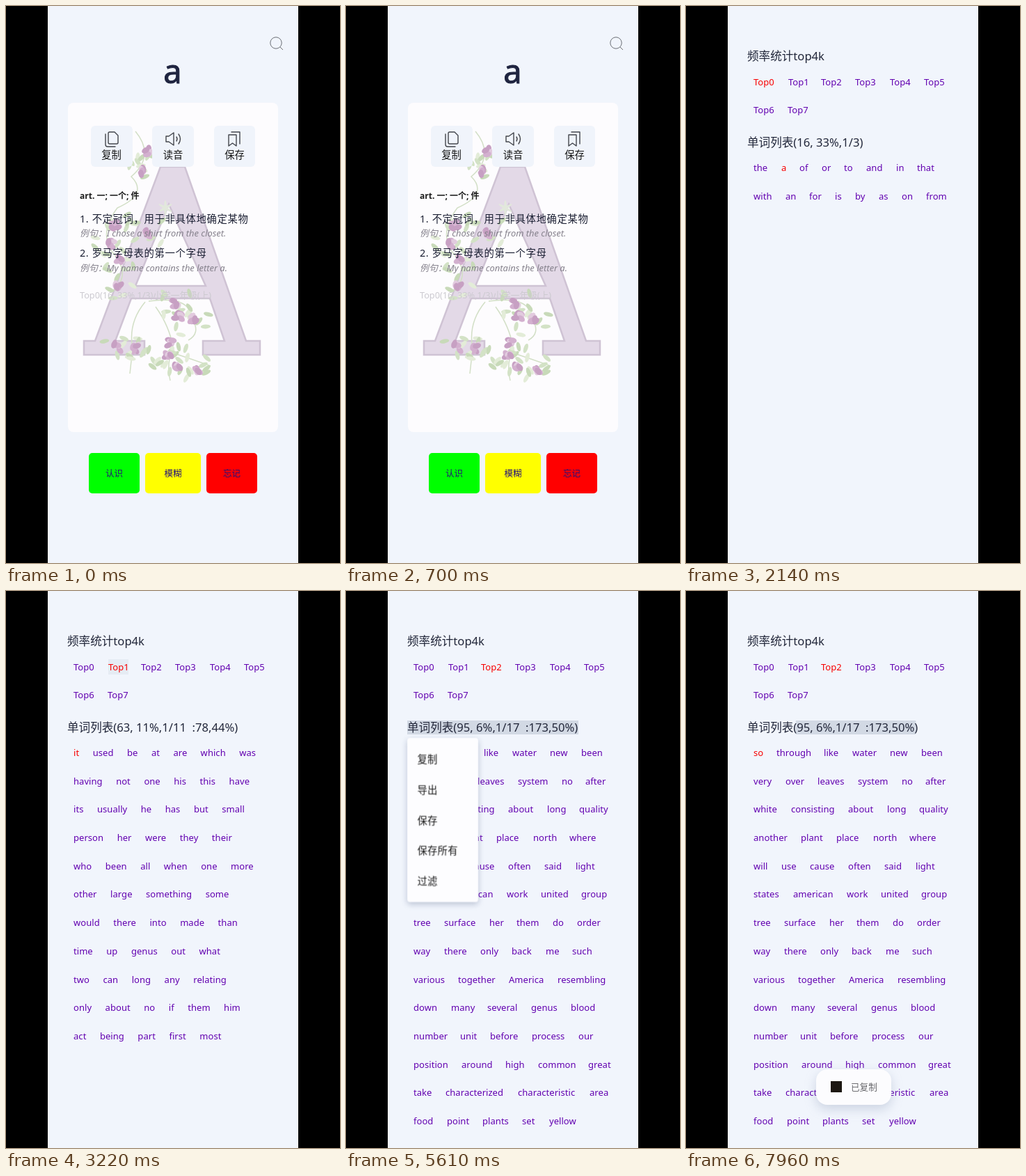
An HTML page for the animation above (8 s loop, 480 by 800 pixels).

```html
<!DOCTYPE html>
<html lang="zh-CN">
<head>
<meta charset="utf-8">
<title>Word list</title>
<style>
html, body { margin: 0; width: 100%; height: 100%; overflow: hidden; background: #000; }
svg { display: block; width: 480px; height: 800px; font-family: "Noto Sans", "Noto Sans CJK SC", "Noto Sans CJK", sans-serif; }
text { white-space: pre; }
.mid { text-anchor: middle; }
.word { font-size: 13px; letter-spacing: .05px; fill: #6200b0; }
.current { fill: #f80000; }
.head { font-size: 16.6px; fill: #22273a; }
.label { font-size: 14.3px; fill: #161616; }
.sense { font-size: 14.4px; letter-spacing: .6px; fill: #1b1f33; }
.example { font-size: 12.9px; font-style: italic; fill: #85818c; }
.answer { font-size: 12.5px; fill: #25107a; text-anchor: middle; }
.icon { fill: none; stroke: #43464c; stroke-width: 1.4; stroke-linejoin: round; stroke-linecap: round; }

#card, #list, #toast, .state { animation: 8s linear infinite; }
#card { animation-name: cardOut; }
#list { animation-name: listIn; }
#toast { animation-name: toast; filter: drop-shadow(0 6px 8px rgba(120,135,170,.3)); }
.state { animation-timing-function: step-end; }
#state0 { animation-name: show0; }
#state1 { animation-name: show1; }
#state2 { animation-name: show2; }
#menu { animation: menuFade 8s linear infinite, menuGrow 8s linear infinite; transform-origin: 139px 211px; filter: drop-shadow(0 3px 4px rgba(100,115,150,.4)); }

/* 700 ms page cross-fade */
@keyframes cardOut { 0%, 11.25% { opacity: 1; animation-timing-function: cubic-bezier(.4,0,.2,1); } 20%, 100% { opacity: 0; } }
@keyframes listIn { 0%, 11.25% { opacity: 0; animation-timing-function: cubic-bezier(.4,0,.2,1); } 20%, 100% { opacity: 1; } }
@keyframes show0 { 0% { visibility: visible; } 36.5%, 100% { visibility: hidden; } }
@keyframes show1 { 0% { visibility: hidden; } 36.5% { visibility: visible; } 52%, 100% { visibility: hidden; } }
@keyframes show2 { 0% { visibility: hidden; } 52%, 100% { visibility: visible; } }
@keyframes menuFade { 0%, 68.8% { opacity: 0; } 69.2%, 88% { opacity: 1; } 89%, 100% { opacity: 0; } }
@keyframes menuGrow { 0%, 68.8% { transform: scale(.8); animation-timing-function: cubic-bezier(0,0,.2,1); } 70.3%, 100% { transform: none; } }
@keyframes toast { 0%, 89.2% { opacity: 0; } 92%, 100% { opacity: 1; } }

.ripple { opacity: 0; fill: #5a6b85; animation: press 8s linear infinite; }
.ripple circle { transform-box: fill-box; transform-origin: center; animation: grow 8s infinite; animation-delay: inherit; }
@keyframes press { 0% { opacity: 0; } .9%, 4.9% { opacity: .2; } 6.9%, 100% { opacity: 0; } }
/* spreads from the touch point to the middle of its area */
@keyframes grow {
  0% { transform: translateX(var(--touch)) scale(.3); animation-timing-function: cubic-bezier(.4,0,.2,1); }
  2.8%, 100% { transform: none; }
}
</style>
</head>
<body>
<svg viewBox="0 0 480 800">
  <rect x="60" width="360" height="800" fill="#f1f5fc"/>

  <g id="card">
    <g fill="none" stroke="#6a6d74"><circle cx="388" cy="53" r="8.2"/><path d="M394 59l4 4"/></g>
    <text class="mid" x="239.5" y="111" font-size="47" fill="#1f2440" stroke="#1f2440">a</text>
    <rect x="89" y="139" width="302" height="473" rx="8" fill="#fdfcfe"/>
    <path d="M222 231H257L345 481H365V501H283V481H314L293 420H180L157 481H199V501H112V481H128Z M234 285L186 402H287Z"
      fill="#e3d9e7" fill-rule="evenodd" stroke="#cfc3d4" stroke-width="2.500"/>
    <g id="vines"></g>
    <g fill="#f0f4fb">
      <rect x="122" y="172" width="60" height="59" rx="6"/>
      <rect x="210" y="172" width="60" height="59" rx="6"/>
      <rect x="299" y="172" width="59" height="59" rx="6"/>
    </g>
    <g class="icon">
      <path d="M149 181h7l5 5v10q0 2-2 2h-10q-2 0-2-2v-13q0-2 2-2zM143 184v15q0 3 3 3h11"/>
      <path d="M230 187h4l7-5v18l-7-5h-4zM245 188q2 3 0 6M248 184q5 7 0 14"/>
      <path d="M320 185h11v16l-5.500-4-5.500 4zM324 181h12v17"/>
    </g>
    <g class="label mid">
      <text x="151.500" y="218.500">复制</text><text x="240" y="218.500">读音</text><text x="328.500" y="218.500">保存</text>
    </g>
    <text x="106" y="277" font-size="12" font-weight="700" fill="#1c1c1c">art. 一; 一个; 件</text>
    <text class="sense" x="106" y="311">1. 不定冠词，用于非具体地确定某物</text>
    <text class="example" x="106" y="331">例句：I chose a shirt from the closet.</text>
    <text class="sense" x="106" y="360">2. 罗马字母表的第一个字母</text>
    <text class="example" x="106" y="380.500">例句：My name contains the letter a.</text>
    <text x="106" y="419.500" font-size="12.7" font-weight="500" fill="#cccad0">Top0(16, 33%,1/3)小学一年级(上)</text>
    <rect x="119" y="642" width="73" height="58" rx="5" fill="#0f0"/>
    <rect x="200" y="642" width="80" height="58" rx="5" fill="#ff0"/>
    <rect x="288" y="642" width="73" height="58" rx="5" fill="#f00"/>
    <text class="answer" x="155.500" y="675.500">认识</text>
    <text class="answer" x="240" y="675.500">模糊</text>
    <text class="answer" x="324.500" y="675.500">忘记</text>
  </g>

  <g id="list">
    <g id="ripples"></g>
    <text class="head" x="88" y="78">频率统计top4k</text>
    <g id="states"></g>
    <g id="menu">
      <rect x="88" y="211" width="102" height="236" rx="4" fill="#fdfdff"/>
      <g id="items"></g>
    </g>
    <g id="toast">
      <rect x="187" y="687" width="108" height="51" rx="16" fill="#fcfcfe"/>
      <rect x="208" y="704" width="16" height="16" fill="#1c1712"/>
      <text x="237" y="716.500" font-size="12.6" fill="#66666a">已复制</text>
    </g>
  </g>
</svg>
<script>
const fill = (id, html) => document.getElementById(id).innerHTML = html;
const ROW = 40.69;

// A leading number is the word's x; words without one follow at a fixed gap.
function wordRows(rows, y, current) {
  return rows.map((row, i) => {
    const words = row.split(' ').map((token, k) => {
      const [, x, word] = token.match(/^(\d*)(.+)$/);
      const place = x ? `x="${x}"` : k ? 'dx="19.5"' : 'x="97"';
      return `<tspan ${place}${word === current ? ' class="current"' : ''}>${word}</tspan>`;
    });
    return `<text class="word" y="${y + i * ROW}">${words.join('')}</text>`;
  }).join('');
}

const tabs = ['97Top0 147Top1 194Top2 243Top3 293Top4 342Top5', '97Top6 146Top7'];
const states = [
  { title: '(16, 33%,1/3)', current: 'a', rows: [
    '97the 137a 163of 195or 227to 259and 302in 332that',
    '97with 143an 177for 214is 243by 277as 310on 345from'] },
  { title: '(63, 11%,1/11  :78,44%)', current: 'it', rows: [
    'it used be at are which was', 'having not one his this have', 'its usually he has but small',
    'person her were they their', 'who been all when one more', 'other large something some',
    'would there into made than', 'time up genus out what', 'two can long any relating',
    'only about no if them him', 'act being part first most'] },
  { title: '(95, 6%,1/17  :173,50%)', current: 'so', rows: [
    '97so 130through 198like 239water 293new 338been',
    '97very 143over 189leaves 247system 310no 344after',
    '97white 151consisting 233about 289long 335quality',
    '97another 165plant 216place 269north 321where',
    '97will 137use 178cause 233often 285said 330light',
    '97states 154american 231work 280united 338group',
    '97tree 141surface 206her 245them 297do 332order',
    '97way 141there 193only 238back 287me 325such',
    '97various 161together 234America 304resembling',
    '97down 151many 203several 266genus 323blood',
    '97number 164unit 207before 267process 334our',
    '97position 166around 229high 276common 348great',
    '97take 143characterized 247characteristic 350area',
    '97food 145point 196plants 253set 292yellow'] }
];
fill('states', states.map((s, i) => `<g class="state" id="state${i}">
  ${wordRows(tabs, 113.5, 'Top' + i)}
  <text class="head" x="88" y="201.500">单词列表${s.title}</text>
  ${wordRows(s.rows, 237, s.current)}</g>`).join(''));

let clips = 0;
function ripple(x, y, w, h, touch, at) {
  const id = 'clip' + clips++;
  return `<clipPath id="${id}"><rect x="${x}" y="${y}" width="${w}" height="${h}"/></clipPath>
    <g clip-path="url(#${id})"><g class="ripple" style="--touch:${touch}px;animation-delay:${at}ms">
    <circle cx="${x + w / 2}" cy="${y + h / 2}" r="${Math.hypot(w, h) / 2 + 6}"/></g></g>`;
}
fill('ripples',
  ripple(147, 98.5, 29, 21, 0, 2720) +
  ripple(194, 98.5, 31, 21, 0, 3960) +
  ripple(88, 186, 246, 19.5, 40, 5440) +
  ripple(88, 186, 246, 19.5, 70, 7880));

fill('items', ripple(88, 220, 102, 44, 0, 6930) +
  ['复制', '导出', '保存', '保存所有', '过滤'].map((label, i) =>
    `<text class="label" x="102.500" y="${247 + i * 43.9}" letter-spacing=".3">${label}</text>`).join(''));

// Climbing flowers: leaves scattered around each blossom.
let seed = 7;
const random = () => (seed = seed * 16807 % 2147483647) / 2147483647;
const blossoms = [[202, 209], [197, 237], [157, 314], [150, 342], [163, 364], [162, 402], [204, 326],
  [242, 428], [270, 448], [247, 447], [185, 492], [160, 490], [238, 484], [232, 500], [274, 522], [246, 521]];
const leafColors = ['#d3e2c6', '#e3ecd8', '#c8dab9'];
const petalColors = ['#d3b0cf', '#c7a0c3', '#e2cbdf'];
const oval = (x, y, rx, ry, turn, color) =>
  `<ellipse rx="${rx}" ry="${ry}" fill="${color}" transform="translate(${x} ${y}) rotate(${turn})"/>`;
let plants = `<path d="M186 180Q215 215 180 245Q205 270 160 290Q130 330 158 360Q180 390 150 412M200 425Q175 455 182 492L178 528M205 424Q265 415 268 450Q280 470 262 480M215 432Q235 460 240 490Q230 515 236 538M245 500Q275 510 294 517"
  fill="none" stroke="#d2dfc6" stroke-width="1.5"/>`;
for (const [x, y] of blossoms) {
  for (let i = 0; i < 6; i++)
    plants += oval(x + random() * 44 - 22, y + random() * 36 - 18, 7, 3, random() * 180, leafColors[i % 3]);
  for (let i = 0; i < 5; i++)
    plants += oval(x + random() * 10 - 5, y + random() * 10 - 5, 6, 4, random() * 180, petalColors[i % 3]);
}
for (let i = 0; i < 3; i++) plants += oval(229, 290, 11, 2, 30 + i * 60, '#e2e8dc');
fill('vines', plants);
</script>
</body>
</html>
```
